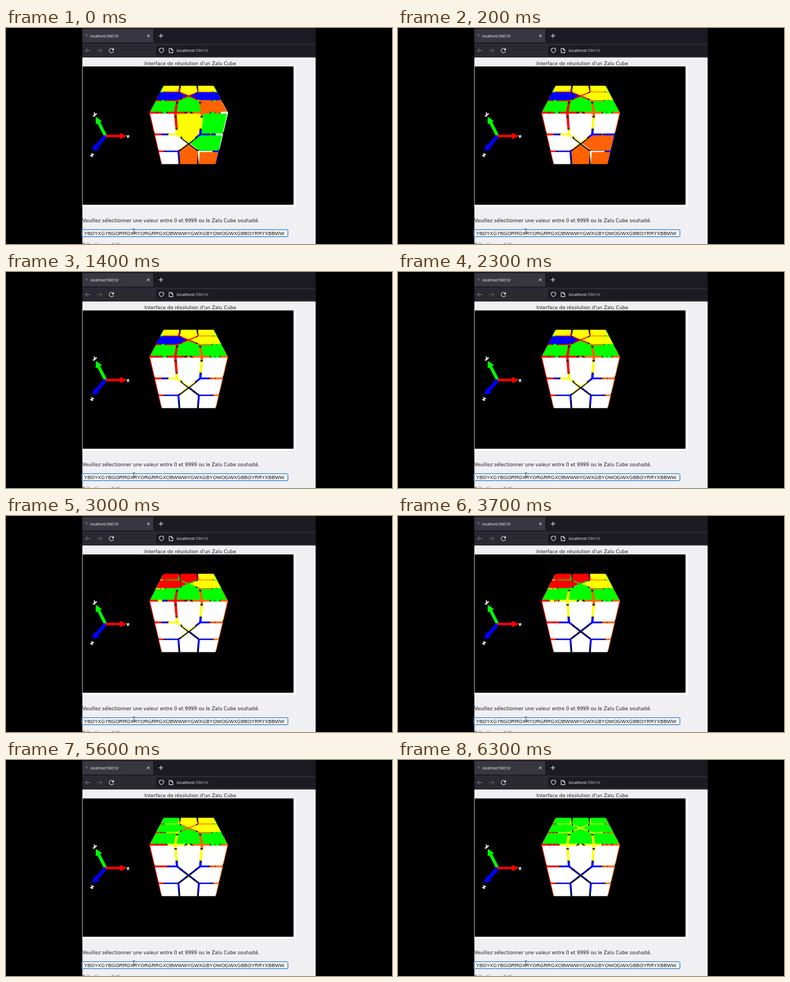
An HTML page that plays this animation: 690x388 px, repeating every 6.4 s.

```html
<!DOCTYPE html>
<html lang="fr">
<head>
<meta charset="utf-8">
<title>Cube</title>
<style>
  html, body { margin: 0; width: 100%; height: 100%; overflow: hidden; background: #000; }
  svg { display: block; width: 100vw; height: 100vh; }
  .ui { font-family: "Open Sans", "Noto Sans", sans-serif; fill: #fbfbfe; }
  .page { font: 8.52px "DejaVu Sans", sans-serif; fill: #1c1c1e; }
  .field { font: 8.875px "Liberation Sans", Arial, sans-serif; fill: #000; }
  .axis { font: bold 9px "DejaVu Sans", sans-serif; fill: #fff; stroke: #fff; stroke-width: .7; text-anchor: middle; }
  .line { fill: none; stroke: #fbfbfe; stroke-width: 1; }
</style>
</head>
<body>
<svg viewBox="0 0 690 388">
  <rect width="690" height="388" fill="#000"/>

  <!-- browser bars -->
  <rect x="136.500" width="417" height="28" fill="#1c1b22"/>
  <rect x="136.500" y="2" width="126.500" height="24" fill="#383741"/>
  <rect x="136.500" y="28" width="417" height="25" fill="#2b2a33"/>
  <rect x="268" y="31" width="285.500" height="19" rx="2" fill="#1c1b22"/>
  <rect x="142" y="11" width="4" height="4" fill="#55545e"/>
  <text class="ui" x="150.500" y="16.600" font-size="6.650">localhost:56610/</text>
  <path class="line" d="M252.300 11.800l4.400 4.400M256.700 11.800l-4.400 4.400"/>
  <path class="line" d="M273 14h8M277 10v8"/>
  <path class="line" style="stroke:#85848c" d="M150.500 40.500h-8.500M145.500 37l-3.500 3.500 3.500 3.500"/>
  <path class="line" style="stroke:#6a6972" d="M163 40.500h8.500M168 37l3.500 3.500-3.500 3.500"/>
  <path class="line" d="M191.700 38.200a4 4 0 1 0 .6 3.500"/>
  <path d="M192.800 36v4h-4z" fill="#fbfbfe"/>
  <path class="line" d="M278 36l4 1.300c0 4-1.200 6-4 7.500-2.800-1.500-4-3.500-4-7.500z"/>
  <path class="line" d="M291.700 36.500h4l2.500 2.500v5.500h-6.500zM295.500 36.500v2.700h2.700"/>
  <text class="ui" x="305" y="43.200" font-size="7.650">localhost<tspan fill="#c4c4ca">:56610</tspan></text>

  <!-- page -->
  <rect x="136.500" y="53" width="417" height="335" fill="#f0f0f3"/>
  <rect x="136.500" y="68" width="381.500" height="253" fill="#fff"/>
  <rect x="137" y="69" width="377" height="248.500" fill="#000"/>
  <text class="page" x="247.500" y="66.500">Interface de résolution d'un Zalu Cube</text>
  <text class="page" x="136.500" y="349">Veuillez sélectionner une valeur entre 0 et 9999 ou le Zalu Cube souhaité.</text>
  <rect x="136" y="361.800" width="368.500" height="13.600" rx="1.500" fill="#fff" stroke="#9cc3ee"/>
  <rect x="136.800" y="362.600" width="366.900" height="12" rx="1" fill="#fff" stroke="#2a75c8"/>
  <text class="field" id="field" x="139.500" y="372"></text>
  <path d="M226.500 360.500h4M228.500 360.500v8.500M226.500 369h4" fill="none" stroke="#444" stroke-width=".8"/>
  <text class="page" x="136.500" y="393">Sélection validée</text>

  <!-- axes -->
  <g id="axes"></g>
  <text class="axis" transform="translate(218.500 196.800) rotate(-12) scale(.8)">x</text>
  <text class="axis" transform="translate(158 157.500) rotate(25)">y</text>
  <text class="axis" transform="translate(152.500 230.500) rotate(28)">z</text>

  <g id="cube"></g>
</svg>
<script>
const NS = 'http://www.w3.org/2000/svg';
const LOOP = 6400, GAP = 0.048;
const COLORS = { W: '#fff', Y: '#ff0', R: '#f00', O: '#ff6200', G: '#0f0', B: '#00f' };
const SCRAMBLE = 'YBOYXGYBGORROXRYORGRRGXOBWWWYGWXGBYOWOGWXGBBOYRRYXBBWW';

// face: normal axis, first cell, column axis, row axis (order of the string)
const FACES = {
  U: [1, [1, 1, -1], 2, 0],
  B: [2, [1, 1, -1], 0, 1],
  L: [0, [-1, 1, -1], 2, 1],
  F: [2, [-1, 1, 1], 0, 1],
  R: [0, [1, 1, 1], 2, 1],
  D: [1, [-1, -1, -1], 2, 0]
};

// clockwise corner turns: time, corner
const TURNS = [
  [0, [-1, -1, 1]],
  [100, [1, 1, 1]],
  [1200, [1, -1, 1]],
  [2400, [-1, 1, -1]],
  [3500, [-1, -1, -1]],
  [4900, [-1, 1, -1]],
  [6200, [1, 1, -1]]
];

const add = (parent, tag, attrs) => {
  const el = document.createElementNS(NS, tag);
  for (const k in attrs) el.setAttribute(k, attrs[k]);
  return parent.appendChild(el);
};
const key = (p, axis) => p.join() + '|' + axis;

function cells(name) {
  const [axis, first, col, row] = FACES[name];
  const base = Object.keys(FACES).indexOf(name) * 9;
  const list = [];
  for (let i = 0; i < 9; i++) {
    if (i === 4) continue;
    const p = first.slice();
    p[col] *= 1 - i % 3;
    p[row] *= 1 - Math.floor(i / 3);
    list.push({ p: p.map(n => n || 0), axis, color: SCRAMBLE[base + i] });
  }
  return list;
}

function turn(state, c) {
  const next = c[0] * c[1] * c[2] > 0 ? [2, 0, 1] : [1, 2, 0];
  return state.map(s => {
    const moved = s.p.every((n, i) => !n || n === c[i]);
    if (!moved) return s;
    const p = [];
    s.p.forEach((n, i) => { p[next[i]] = n ? c[next[i]] : 0; });
    return { p, axis: next[s.axis], color: s.color };
  });
}

function project([x, y, z]) {
  const dy = y / 3 - 0.5, dz = z / 3 - 0.5;
  const depth = 1.378 - dy * 0.6252 - dz * 0.7806;
  const v = 0.2337 + dy * 0.7806 - dz * 0.6252;
  return [326.5 + 197.5 * x / 3 / depth, 187.6 - 212 * v / depth];
}

function outline({ p, axis }) {
  const [a, b] = [0, 1, 2].filter(i => i !== axis);
  const lo = 0.5 + GAP, hi = 1.5 - GAP, w = 0.5 - GAP, k = 0.5 + 0.414 * GAP;
  const corner = p[a] && p[b];
  const shape = corner
    ? [[lo, lo], [hi, lo], [hi, hi], [lo, hi]]
    : [[hi, -w], [hi, w], [k, w], [1.414 * GAP, 0], [k, -w]];
  return shape.map(([m, n]) => {
    const q = [];
    q[axis] = 1.5 * p[axis];
    if (corner) { q[a] = m * p[a]; q[b] = n * p[b]; }
    else if (p[a]) { q[a] = m * p[a]; q[b] = n; }
    else { q[a] = n; q[b] = m * p[b]; }
    return project(q).map(t => t.toFixed(2)).join();
  }).join(' ');
}

function arrow(x, y, color, width) {
  const ox = 178, oy = 194, len = Math.hypot(x - ox, y - oy);
  const h = width / 2, b = len - 12;
  add(document.getElementById('axes'), 'path', {
    d: `M0 ${-h}H${b}V${-h - 3.5}L${len} 0L${b} ${h + 3.5}V${h}H0z`,
    fill: color,
    transform: `translate(${ox} ${oy}) rotate(${Math.atan2(y - oy, x - ox) * 180 / Math.PI})`
  });
}
arrow(160.5, 159.5, '#0f0', 5.5);
arrow(154.5, 221.5, '#00f', 6.5);
arrow(216, 194, '#f00', 4.5);

document.getElementById('field').textContent = SCRAMBLE;

// far faces first: their inner sides show through the gaps
const cube = document.getElementById('cube');
const start = [...'BDLRFU'].flatMap(cells);
const tiles = start.map(s => ({ id: key(s.p, s.axis), el: add(cube, 'polygon', { points: outline(s) }) }));

const looks = [];
TURNS.reduce((state, [, corner]) => {
  const after = turn(state, corner);
  looks.push(Object.fromEntries(after.map(s => [key(s.p, s.axis), COLORS[s.color]])));
  return after;
}, start);

let shown = -1;
function draw() {
  const t = performance.now() % LOOP;
  const n = TURNS.filter(([at]) => at <= t).length - 1;
  if (n !== shown) {
    shown = n;
    for (const { id, el } of tiles) el.setAttribute('fill', looks[n][id]);
  }
  requestAnimationFrame(draw);
}
draw();
</script>
</body>
</html>
```
